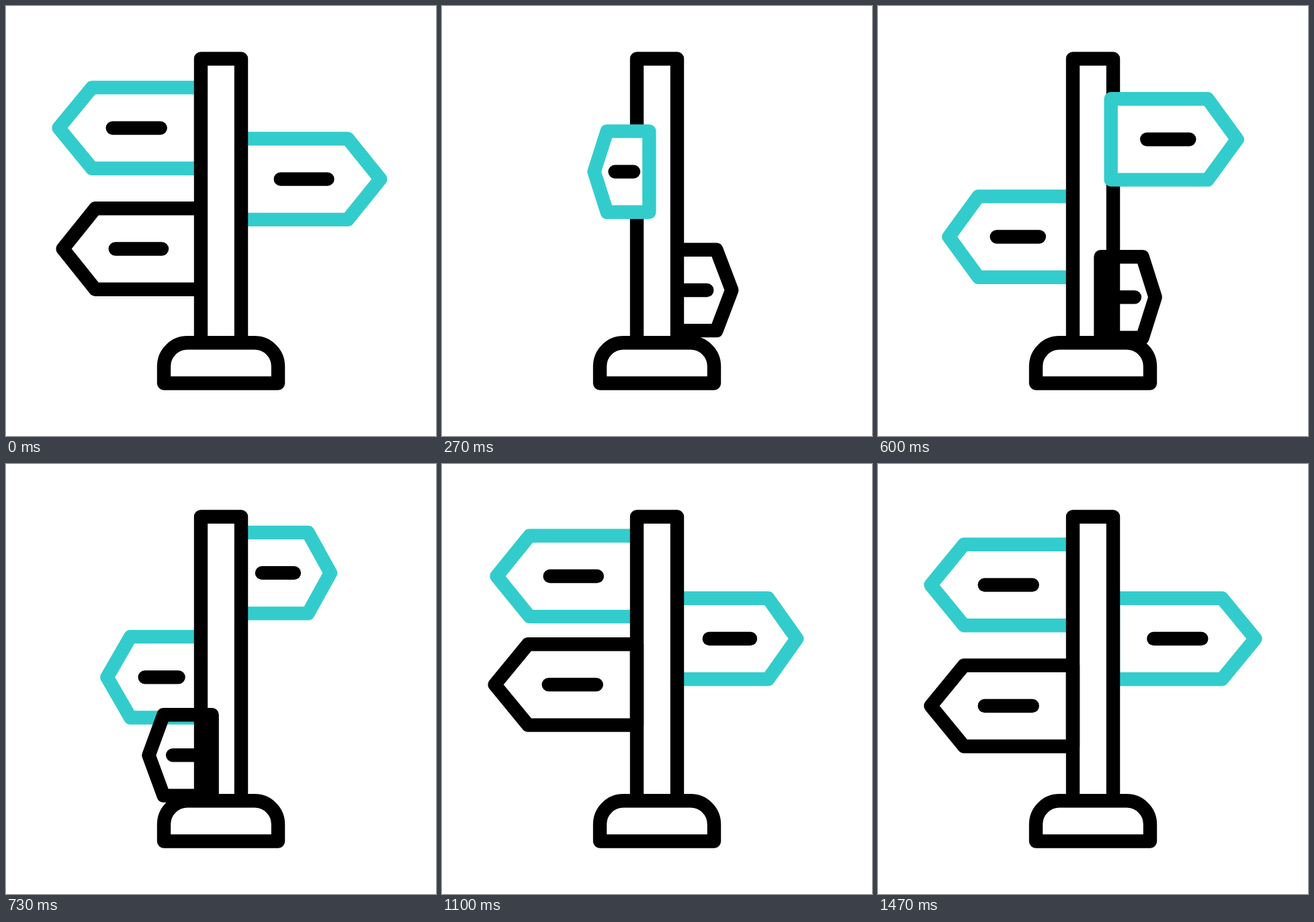
Animation of 640 by 640 pixels, one loop 1670 ms. Source, as an HTML page with a canvas:

```html
<!DOCTYPE html>
<html lang="en">
<head>
<meta charset="utf-8">
<title>Signpost</title>
<style>
  html, body { margin: 0; width: 100%; height: 100%; overflow: hidden; background: #fff; }
  canvas { display: block; width: 100vmin; height: 100vmin; }
</style>
</head>
<body>
<canvas id="stage" width="640" height="640"></canvas>
<script>
const ctx = document.getElementById('stage').getContext('2d');
const LOOP = 1670, STEP = 33.35, AXIS = 320;
const TEAL = '#33cccc', BLACK = '#000';

// Motion through [step, value] stops: at rest where it turns round, brisk where it passes through.
function ease(...stops) {
  const slope = i => {
    const before = stops[i - 1], here = stops[i], after = stops[i + 1];
    if (!before || !after) return 0;
    const passes = (here[1] - before[1]) * (after[1] - here[1]) > 0;
    return passes ? 1.4 * (after[1] - before[1]) / (after[0] - before[0]) : 0;
  };
  return n => {
    const i = stops.findIndex(stop => stop[0] > n);
    if (i === 0) return stops[0][1];
    if (i < 0) return stops[stops.length - 1][1];
    const [n0, v0] = stops[i - 1], [n1, v1] = stops[i];
    const d = n1 - n0, u = (n - n0) / d;
    return v0 + (v1 - v0) * u * u * (3 - 2 * u)
      + d * u * (1 - u) * (slope(i - 1) * (1 - u) - slope(i) * u);
  };
}

// turn: -1 points left, 1 points right.
const upper = {
  color: TEAL, filled: true,
  turn: ease([1.4, -1], [18.8, 0.9], [33.7, -1]),
  y: ease([-1, 180], [10.7, 257], [23.8, 157], [44, 180]),
  inFront: n => n > 1.4 && n < 18.8
};
const middle = {
  color: TEAL, filled: true,
  turn: ease([-1, 1], [8.6, 0], [19, -0.9], [26.6, 0], [36, 1]),
  y: ease([-1, 260], [5, 228], [15.6, 349], [31.5, 260]),
  inFront: () => false
};
const lower = {
  color: BLACK, filled: false,
  turn: ease([-0.9, -1], [12.7, 1.017], [26.9, -1]),
  y: ease([-1, 360], [10.8, 433.4], [22, 433.4], [33.5, 327.8], [44, 360]),
  inFront: n => n > 12.7
};
const signs = [middle, upper, lower];

function outline(path, color, filled) {
  if (filled) {
    ctx.fillStyle = '#fff';
    ctx.fill(path);
  }
  ctx.strokeStyle = color;
  ctx.stroke(path);
}

function drawSign({ color, filled, turn, y }, n) {
  const half = 60.2, scale = turn(n);
  const x = reach => AXIS + reach * scale;
  const board = new Path2D(), dash = new Path2D();
  ctx.save();
  ctx.translate(0, y(n));
  board.moveTo(x(30), -half);
  board.lineTo(x(192), -half);
  board.lineTo(x(241.5), 0);
  board.lineTo(x(192), half);
  board.lineTo(x(30), half);
  board.closePath();
  outline(board, color, filled);
  dash.moveTo(x(90.3), 0);
  dash.lineTo(x(161.3), 0);
  outline(dash, BLACK, false);
  ctx.restore();
}

const pole = new Path2D();
pole.rect(AXIS - 30, 78.5, 60, 422.8);
const base = new Path2D('M235 561.5V536A35 35 0 0 1 270 501.3H370A35 35 0 0 1 405 536V561.5Z');

function draw(n) {
  ctx.fillStyle = '#fff';
  ctx.fillRect(0, 0, 640, 640);
  ctx.lineWidth = 20.4;
  ctx.lineCap = ctx.lineJoin = 'round';
  signs.filter(sign => !sign.inFront(n)).forEach(sign => drawSign(sign, n));
  outline(pole, BLACK, true);
  outline(base, BLACK, true);
  signs.filter(sign => sign.inFront(n)).forEach(sign => drawSign(sign, n));
}

const start = performance.now();
function tick() {
  const time = (performance.now() - start) % LOOP;
  draw(Math.floor((time + 5) / STEP));
  requestAnimationFrame(tick);
}
tick();
</script>
</body>
</html>
```
